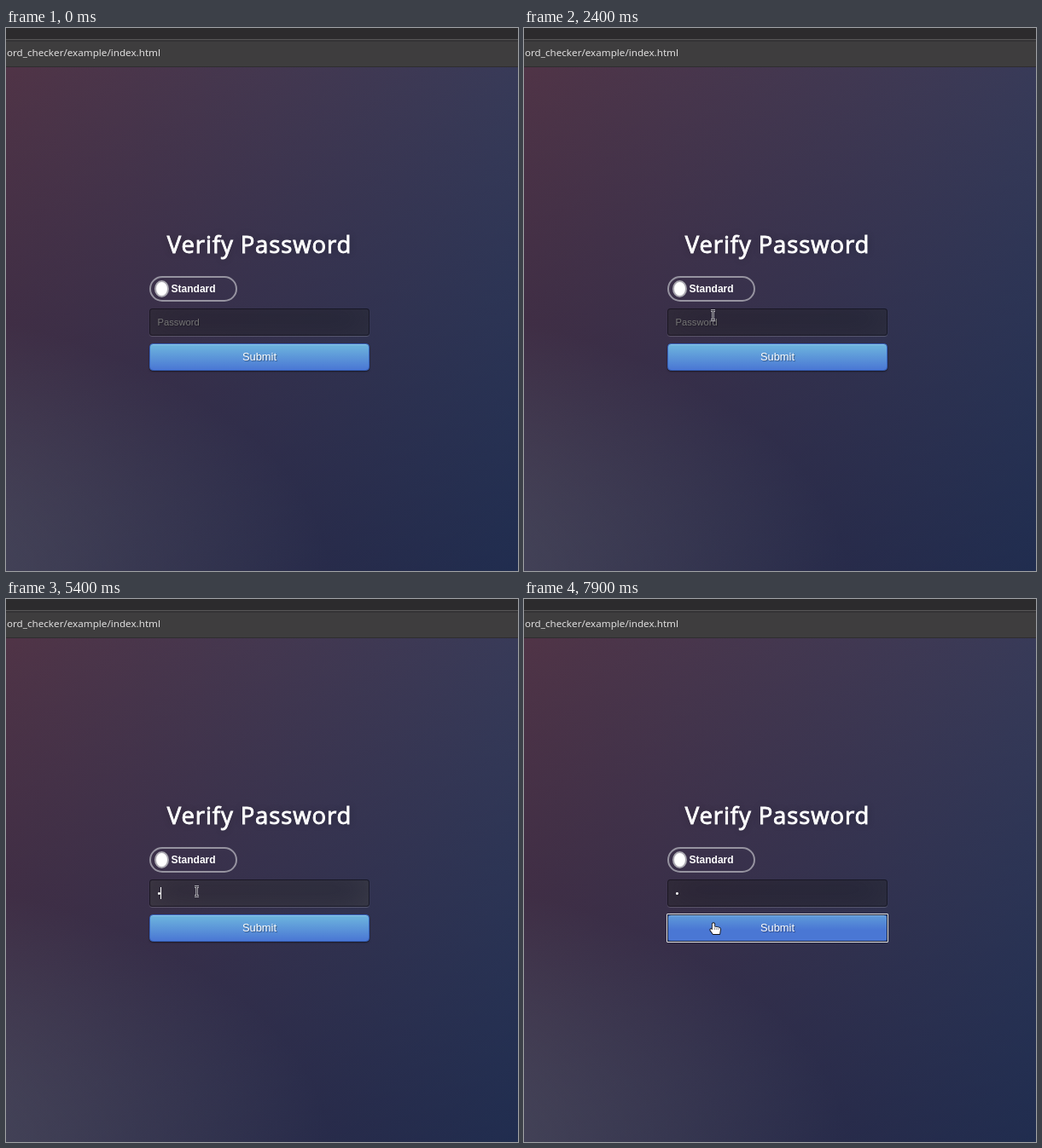
These frames come from a looping animation (600 px wide and 637 px high, 8000 ms). An HTML page with a canvas:

```html
<!DOCTYPE html>
<html lang="en">
<head>
<meta charset="utf-8">
<title>Verify Password</title>
<style>
  html, body { margin: 0; width: 100%; height: 100%; overflow: hidden; background: #2c2b2d; }
  #stage { position: relative; width: 600px; height: 637px; overflow: hidden;
    font-family: "Liberation Sans", Arial, sans-serif; color: #fff; }
  #stage > * { position: absolute; box-sizing: border-box; white-space: nowrap; }

  #tabs { left: 0; top: 0; width: 600px; height: 14px; background: #2c2b2d; border-bottom: 1px solid #585758; }
  #toolbar { left: 0; top: 14px; width: 600px; height: 32px; background: #3e3d3e;
    border-top: 2px solid #343335; border-bottom: 1px solid #2e2d2f; }
  #url { right: 419px; top: 19px; line-height: 20px; color: #dedddd;
    font-family: "Noto Sans", sans-serif; font-size: 11.65px; }

  #page { left: -333px; top: 46px; width: 1260px; height: 598px;
    background:
      radial-gradient(ellipse farthest-corner at 0% 100%, rgba(104,128,138,.4) 10%, rgba(138,114,76,0) 40%),
      linear-gradient(to bottom, rgba(57,173,219,.22), rgba(42,60,87,.4)),
      linear-gradient(135deg, #670d10, #092756); }

  #title { left: 168px; top: 234.3px; width: 258px; line-height: 40px; text-align: center;
    font-family: "Open Sans", sans-serif; font-size: 27.5px; letter-spacing: .86px;
    -webkit-text-stroke: .9px #fff; text-shadow: 0 0 8.6px rgba(0,0,0,.3); }

  #switch { left: 168px; top: 291px; width: 103px; height: 30px; border: 2px solid #9693a0; border-radius: 15px; }
  #knob { left: 174px; top: 296px; width: 17px; height: 20px; background: #fff;
    border: 2px solid #aaa8b0; border-radius: 50%; }
  #mode { left: 193.6px; top: 291px; line-height: 30px; font-size: 12px; font-weight: 700; }

  #field { left: 168px; top: 329px; width: 258px; height: 32px; background: rgba(0,0,0,.3);
    border: 1px solid rgba(0,0,0,.3); border-radius: 3.5px; }
  #value { left: 177.6px; top: 329px; line-height: 32px; font-size: 11.2px;
    text-shadow: 1px 1px 1px rgba(0,0,0,.3); }
  #caret { top: 338px; width: 1px; height: 14px; background: #fff; }

  #submit { left: 168px; top: 370px; width: 258px; height: 32px; line-height: 30px; text-align: center;
    font-size: 12.9px; border: 1px solid #3762bc; border-radius: 4.3px;
    background: #4a77d4 linear-gradient(#6eb6de, #4a77d4) repeat-x;
    text-shadow: 1px 1px 1px rgba(0,0,0,.4);
    box-shadow: inset 0 1px 0 rgba(255,255,255,.2), 0 1px 2px rgba(0,0,0,.5); }
  #ring { left: 167px; top: 369px; width: 260px; height: 34px; border: 1px solid #e2e2e4;
    border-radius: 1px; box-shadow: inset 0 0 0 1px #20263c; }
  #pointer { left: 0; top: 0; }
</style>
</head>
<body>
<div id="stage">
  <div id="page"></div>
  <div id="tabs"></div>
  <div id="toolbar"></div>
  <div id="url">ord_checker/example/index.html</div>
  <div id="title">Verify Password</div>
  <div id="switch"></div>
  <div id="knob"></div>
  <div id="mode">Standard</div>
  <div id="field"></div>
  <div id="value">Password</div>
  <div id="caret"></div>
  <div id="submit">Submit</div>
  <div id="ring"></div>
  <canvas id="pointer" width="600" height="637"></canvas>
</div>
<script>
const LOOP = 8000, STEP = 100;
const FOCUS = 3100, TYPED = 5300, HOVER = 7300, CLICK = 7500, BLINK = 600;

const $ = id => document.getElementById(id);
const field = $('field'), value = $('value'), caret = $('caret');
const submit = $('submit'), ring = $('ring');
const ctx = $('pointer').getContext('2d');

const progress = (t, start, length) => Math.min(1, Math.max(0, (t - start) / length));
const easeOut = p => 1 - Math.pow(1 - p, 2.4);

// Pointer stops: time, x, y
const stops = [
  [2400, 221, 337], [2700, 222, 340], [2900, 222, 341], [3000, 223, 342], [3100, 223, 343],
  [7100, 223, 346], [7200, 221.5, 350], [7300, 222, 364], [7400, 222, 374], [7500, 222, 379], [7600, 222, 380]
];

function pointerAt(t) {
  if (t < 1800) return null;
  if (t < 2400) {
    const p = easeOut(progress(t, 1700, 700));
    return [592 - 371 * p, 250 + 87 * p];
  }
  return stops.filter(s => s[0] <= t).pop().slice(1);
}

function beam(x, y) {
  const path = new Path2D('M-2.5 -5.5 H2.5 M0 -5.5 V5.5 M-2.5 5.5 H2.5');
  ctx.translate(Math.round(x) + .5, y);
  ctx.strokeStyle = 'rgba(235,235,238,.85)';
  ctx.lineWidth = 2.3;
  ctx.stroke(path);
  ctx.strokeStyle = '#26242e';
  ctx.lineWidth = .8;
  ctx.stroke(path);
}

function shape(x, y, path) {
  ctx.translate(x, y);
  ctx.lineJoin = 'round';
  ctx.lineWidth = 1.8;
  ctx.strokeStyle = '#15151a';
  ctx.stroke(path);
  ctx.fillStyle = '#fff';
  ctx.fill(path);
}

function arrow(x, y) {
  shape(x, y, new Path2D('M0 0 V13 L3.2 10.3 L5.2 14.6 L7.2 13.7 L5.3 9.5 H9.4 Z'));
}

function hand(x, y) {
  shape(x, y, new Path2D(
    'M-1.2 1 Q0 -.6 1.2 1 V4.6 L6.6 5.6 Q8 6 8 7.6 L7.2 13 H-.4 L-3.6 8.6 Q-3.9 7 -2.4 7.2 L-1.2 8.2 Z'));
  ctx.lineWidth = .7;
  ctx.strokeStyle = '#55555c';
  ctx.stroke(new Path2D('M1.6 5.4 V8 M3.8 5.8 V8 M5.9 6.2 V8'));
}

function drawPointer(t) {
  ctx.clearRect(0, 0, 600, 637);
  const pos = pointerAt(t);
  if (!pos) return;
  const [x, y] = pos;
  const inField = x > 168 && x < 426 && y > 329;
  ctx.save();
  (t >= 7200 ? hand : inField ? beam : arrow)(x, y);
  ctx.restore();
}

function drawForm(t) {
  const typed = t >= TYPED;
  const glow = .2 + .2 * (easeOut(progress(t, FOCUS, 500)) - easeOut(progress(t, CLICK, 500)));
  field.style.boxShadow =
    `inset 0 -4.3px 38.7px rgba(100,100,100,${glow}), 0 1px 1px rgba(255,255,255,.2)`;

  value.textContent = typed ? '•' : 'Password';
  value.style.color = typed ? '#fff' : '#757575';

  const since = t - (typed ? TYPED : FOCUS);
  const lit = t >= FOCUS && t < CLICK && Math.floor(since / BLINK) % 2 === 0;
  caret.style.visibility = lit ? 'visible' : 'hidden';
  caret.style.left = (typed ? 181 : 178) + 'px';

  submit.style.backgroundPosition = `0 ${-13 * progress(t, HOVER, 100)}px`;
  ring.style.visibility = t >= CLICK ? 'visible' : 'hidden';
}

function frame(now) {
  const t = Math.floor((now % LOOP) / STEP) * STEP;
  drawForm(t);
  drawPointer(t);
  requestAnimationFrame(frame);
}
frame(0);
</script>
</body>
</html>
```
